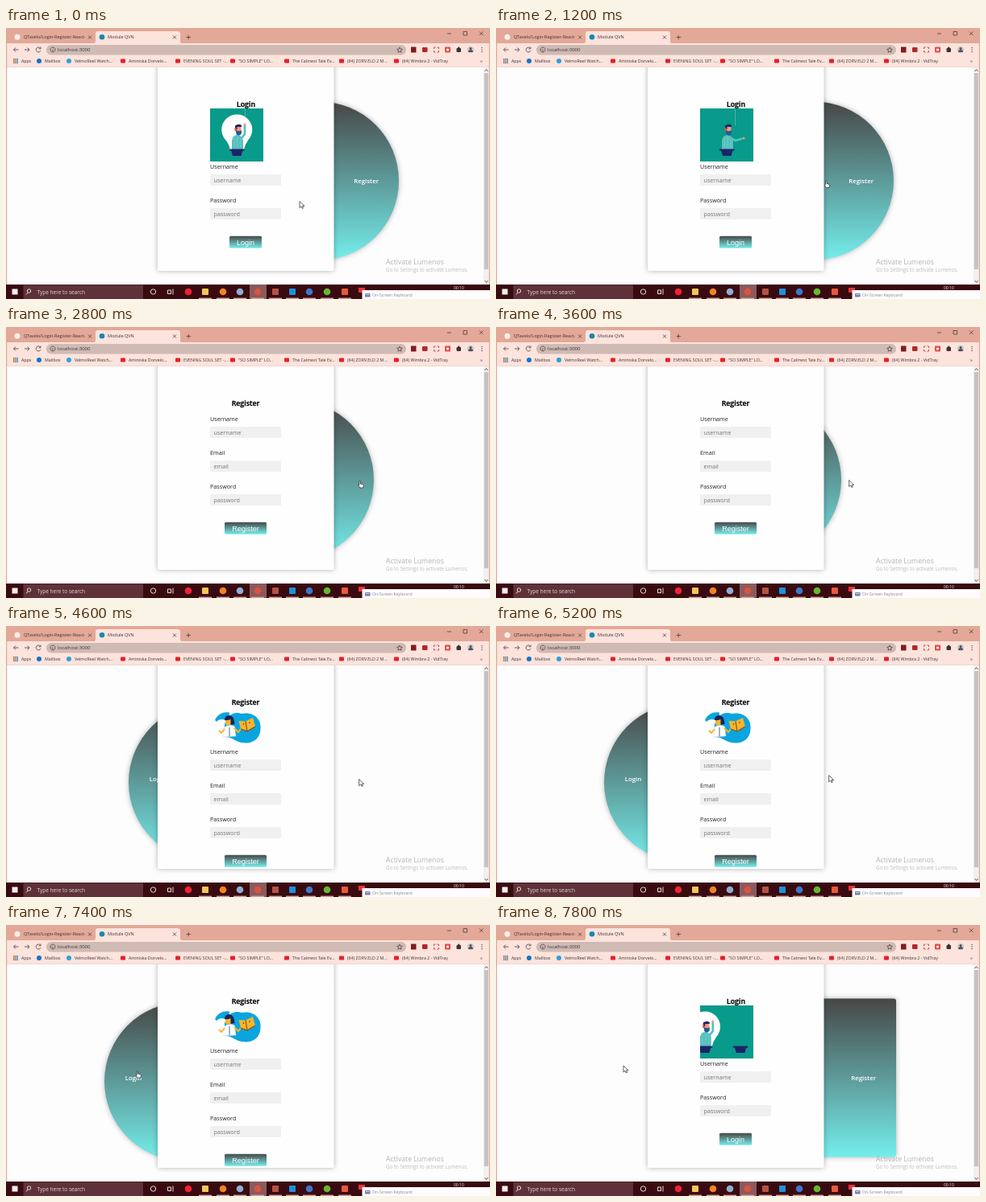
These frames come from a looping animation (600x337 px, 8000 ms). An HTML page:

```html
<!DOCTYPE html>
<html lang="en">
<head>
<meta charset="utf-8">
<title>Login and register</title>
<style>
  html, body { margin: 0; width: 100%; height: 100%; overflow: hidden; background: #fdfdfd; }
  svg { display: block; width: 100vw; height: 100vh; }
  text { font-family: "Open Sans", "Noto Sans", sans-serif; white-space: pre; }
  .tiny { font-size: 5.3px; fill: #3b3335; }
  .tab { font-size: 5.5px; fill: #3b3335; }
  .label { font-size: 7.2px; fill: #222; }
  .hint { font-size: 7.2px; fill: #777; }
  .title { font-size: 8.8px; font-weight: 600; fill: #000; stroke: #000; stroke-width: .3; text-anchor: middle; }
  .button { font: 9px "Liberation Sans", Arial, sans-serif; fill: #fff; text-anchor: middle; }
  .side { font-size: 7.8px; font-weight: 600; fill: #fff; }
  .shadow { filter: drop-shadow(0 0 3px rgba(15, 15, 15, .32)); }
  .line { fill: none; stroke: #5c4a4a; stroke-width: .9; }
</style>
</head>
<body>
<svg viewBox="0 0 600 337" preserveAspectRatio="none">
  <defs>
    <linearGradient id="fade" x2="0" y2="1">
      <stop offset="0" stop-color="#474747"/>
      <stop offset="1" stop-color="#74eeec"/>
    </linearGradient>
    <clipPath id="frame"><rect x="253" y="100" width="66" height="66"/></clipPath>
    <g id="basket" fill="#1c2368">
      <rect x="277" y="150.5" width="18.500" height="2.200" rx="1"/>
      <path d="M279 152H293.500L291.500 159H281Z"/>
    </g>
    <g id="man">
      <path d="M280 151V140Q281 133 287 133Q294 134 294 141V151Z" fill="#55c1bd"/>
      <path d="M283 138V149M287 136V149M291 138V149" stroke="#c7efeb" stroke-width=".7" stroke-dasharray="1 1.800"/>
      <rect x="285" y="122" width="6.500" height="8" rx="2.500" fill="#f39a72"/>
      <path d="M284.500 126Q288 130 292 127V131Q289 136 285.500 132Z" fill="#245a9c"/>
      <path d="M284 126V121.500Q288 118.500 292 121V123H286.500V126Z" fill="#252464"/>
      <rect x="283.500" y="124" width="2" height="4" fill="#e4463f"/>
    </g>
    <g id="bulb">
      <path d="M277.500 151Q277 145 272 139A19 19 0 1 1 300.500 139Q296 145 295 151Z" fill="#fff"/>
      <use href="#man"/>
      <path d="M292 137L296 132V121" fill="none" stroke="#55c1bd" stroke-width="2.600"/>
      <circle cx="296" cy="120" r="1.600" fill="#f39a72"/>
      <use href="#basket"/>
    </g>
    <g id="arm">
      <path d="M291 137L297 140L305 137.500" fill="none" stroke="#55c1bd" stroke-width="2.600"/>
      <circle cx="307" cy="137" r="1.600" fill="#f39a72"/>
    </g>
  </defs>

  <rect width="600" height="337" fill="#fdfdfe"/>
  <rect id="panel" class="shadow" width="197" height="197" fill="url(#fade)"/>
  <text id="panelText" class="side" y="193"></text>
  <rect class="shadow" x="188" y="40" width="218.500" height="262" rx="2" fill="#fefefe"/>

  <g id="loginForm">
    <text class="title" x="297.500" y="97.500">Login</text>
    <g clip-path="url(#frame)">
      <rect x="253" y="100" width="66" height="66" fill="#089a8a"/>
      <path id="string" d="M296.500 100V121" stroke="#75c9bf" stroke-width=".6"/>
      <use id="oldScene" href="#bulb"/>
      <g id="newScene">
        <g id="newMan"><use href="#man"/><use href="#arm"/></g>
        <use href="#basket"/>
      </g>
    </g>
  </g>
  <g id="registerForm">
    <text class="title" x="297" y="97.500">Register</text>
    <g id="art">
      <path d="M259 117Q264 106 277 107.500L276 119Q266 113 261 119Z" fill="#0aa5df"/>
      <path d="M271 122C276 109 284 106 292 109C306 106 317 115 315.500 128C315 142 304 147 292 145C283 143 279 137 270 138Z" fill="#0aa5df"/>
      <path d="M269.500 138L270.500 126Q277 121 283.500 125L285 137Z" fill="#fff" stroke="#c9d6df" stroke-width=".4"/>
      <path d="M271 128L267 133L264 130M283 127L288 132L291 128" fill="none" stroke="#f8b52d" stroke-width="2"/>
      <rect x="272" y="114" width="7" height="9.500" rx="2.500" fill="#f8b52d"/>
      <path d="M271 117Q271 111 277 111Q283 111.500 283.500 122L278.500 123V116Q274 118 271 117Z" fill="#18235a"/>
      <path d="M277 126V137" stroke="#243b6d" stroke-width=".8"/>
      <path d="M288.500 118L297 118.500L306 114L309 125L299 131L291 128Z" fill="#f7b52c"/>
      <path d="M297 118.500L299 131M291 128L299 131L309 125" fill="none" stroke="#86511f" stroke-width="1.200"/>
      <circle cx="294.500" cy="122" r=".8" fill="#54301c"/><circle cx="302" cy="120" r=".8" fill="#54301c"/>
    </g>
    <g id="fields"></g>
  </g>

  <text x="471" y="293.500" font-size="8.700" fill="#b4b4b6">Activate Lumenos</text>
  <text x="471" y="302.500" font-size="6.200" fill="#bdbdc0">Go to Settings to activate Lumenos.</text>
  <g id="scrollbar">
    <rect x="592" y="49" width="7" height="270" fill="#f1f0f1"/>
    <rect x="592.700" y="56" width="5.300" height="244" fill="#c5c3c4"/>
    <path d="M593.500 54L595.500 51.500L597.500 54M593.500 314L595.500 316.500L597.500 314" class="line"/>
  </g>
  <g id="browser"></g>
  <g id="taskbar"></g>

  <g id="cursor" stroke="#222" stroke-width=".7" fill="#fff">
    <path id="arrow" d="M0 0V8L2 6.300L3.300 9L4.600 8.400L3.400 5.800H6Z"/>
    <path id="hand" d="M1.500 1Q2.300 0 3 1V4L6 4.800Q7 5 6.700 6.500L6 9H2.500L.3 6Q.2 5 1.500 5.500Z"/>
    <path id="beam" d="M-1.500 -3.500H1.500M0 -3.500V3.500M-1.500 3.500H1.500" fill="none"/>
  </g>
</svg>

<script>
const $ = id => document.getElementById(id);
const rect = (x, y, w, h, fill, rx = 0) =>
  `<rect x="${x}" y="${y}" width="${w}" height="${h}" rx="${rx}" fill="${fill}"/>`;
const dot = (x, y, r, fill) => `<circle cx="${x}" cy="${y}" r="${r}" fill="${fill}"/>`;
const text = (x, y, content, cls = "tiny", extra = "") =>
  `<text x="${x}" y="${y}" class="${cls}" ${extra}>${content}</text>`;
const line = d => `<path class="line" d="${d}"/>`;

const field = (name, y) =>
  text(253, y, name, "label") + rect(253, y + 7, 88, 14, "#f1f0f1", 1.5) +
  text(257.5, y + 16.5, name.toLowerCase(), "hint");
const button = (name, y, w) =>
  rect(297 - w / 2, y, w, 15, "url(#fade)", 1.5) + text(297, y + 11, name, "button");

const BAR = "#e3a897";
const TOOLBAR = "#fce3dc";

function buildBrowser() {
  const bookmarks = [
    [41, "#1473c8", "Mailbox"], [78, "#2c9fe0", "VelmoReel Watch..."],
    [145, "", "Aminiska Dorvelo..."], [213, "", "EVENING SOUL SET -..."],
    [281, "", "\"SO SIMPLE\" LO..."], [348, "", "The Calmest Tale Ev..."],
    [416, "", "(64) ZORV.ELD 2 M..."], [484, "", "(64) Wimbra 2 - VidTray"]
  ];
  const marks = bookmarks.map(([x, color, name]) =>
    (color ? dot(x, 41, 3, color) : rect(x - 3, 38.6, 6, 4.8, "#e5202a", 1)) + text(x + 7, 43, name));
  const apps = Array.from({ length: 9 }, (_, i) =>
    rect(9 + i % 3 * 2.2, 38 + (i / 3 | 0) * 2.2, 1.6, 1.6, ["#d9483b", "#3f9c58", "#3d78d0"][i % 3]));
  $("browser").innerHTML =
    rect(0, 0, 600, 20, BAR) + rect(0, 19, 600, 30, TOOLBAR) +
    `<path d="M109 19Q111 19 111 16V7Q111 4 114 4H213Q216 4 216 7V16Q216 19 218 19Z" fill="${TOOLBAR}"/>` +
    dot(14, 11.3, 3.5, "#f9eeea") + text(22, 13.3, "QTavelo/Login-Register-React-", "tab") +
    dot(119, 11.3, 3.3, "#1689ad") + text(126, 13.3, "Module QVN", "tab") +
    line("M102 9.500L106 13.500M106 9.500L102 13.500M207 9.500L211 13.500M211 9.500L207 13.500M223.500 11.500H229M226.200 8.800V14.200") +
    line("M547 7H552M567 4.500H571.500V9H567ZM587 4.500L591.500 9M591.500 4.500L587 9") +
    line("M15.500 27H9.500L12 24.500M9.500 27L12 29.500M23 27H29L26.500 24.500M29 27L26.500 29.500M42.500 25A3 3 0 1 0 43 28.200M43 23.500V25.800H40.700") +
    rect(50, 21, 446, 12.5, "#cfbab4", 6.2) + line("M58 24A3 3 0 1 0 58.100 24M58 26.500V29") +
    text(64, 29.2, "localhost:3000", "tiny", 'style="font-size:6px"') +
    line("M488 24L489 26.200L491.300 26.400L489.500 28L490 30.200L488 29L486 30.200L486.500 28L484.700 26.400L487 26.200Z") +
    rect(502, 23.5, 6.5, 7, "#7d1d20") + rect(516, 24, 6.5, 6, "#b3262a", 1) +
    `<path d="M530.500 26V24H532.500M534.500 24H536.500V26M536.500 28V30H534.500M532.500 30H530.500V28" fill="none" stroke="#d34a49"/>` +
    rect(544, 23.5, 7, 7, "#dc5149", 1) + dot(547.5, 27, 1.6, "#fff") +
    rect(558.5, 25, 5.5, 5, "#3d3233", 1) + dot(561.3, 24.8, 1.2, "#3d3233") +
    dot(576, 27, 4.2, "#c4ccd4") + dot(576, 25.5, 1.5, "#594e50") +
    `<path d="M573 30Q573 27 576 27Q579 27 579 30Z" fill="#594e50"/>` +
    [24.5, 27, 29.5].map(y => dot(590, y, .7, "#544747")).join("") +
    apps.join("") + text(19, 43, "Apps") + marks.join("") + text(588, 43, "»", "tab") +
    rect(0, 48.5, 600, .5, "#e2cdca") +
    `<path d="M.600 0V319M599.400 0V319" stroke="${BAR}" stroke-width="1.200"/>`;
}

function buildTaskbar() {
  const icons = [
    [226, "#ef2433"], [247, "#f3c756", 1], [269, "#f18422"], [290, "#8eaed0"],
    [312, "#dd5140"], [334, "#b55343", 1], [355, "#1d91dd", 1], [376, "#3b78cb"],
    [398, "#66b82e"], [420, "#e8593c", 1]
  ];
  $("taskbar").innerHTML =
    rect(0, 319, 600, 18, "#390b11") + rect(21.5, 319.5, 148.5, 17.5, "#5e3238") +
    rect(7.5, 324.5, 7, 7, "#f4eded") +
    `<g stroke="#e8dcdc" fill="none"><circle cx="28.500" cy="327" r="2.200"/><path d="M27 329L25 331.500"/>
     <circle cx="182.500" cy="328" r="3.200"/><path d="M200.500 326H204.500V330.500H200.500ZM207 324.500V331.500"/></g>` +
    text(38.5, 330.7, "Type here to search", "", 'font-size="6.5" fill="#e4d8d9"') +
    rect(302, 319, 21, 18, "#8a5a5d") +
    icons.map(([x, color, square]) =>
      square ? rect(x - 4, 324, 8, 8, color, 1) : dot(x, 328, 4.3, color)).join("") +
    [247, 269, 290, 312, 334, 355, 376, 398, 420].map(x => rect(x - 8, 335.6, 16, 1.4, "#dca19f")).join("") +
    rect(437, 323, 8, 6, "#e5343a") +
    text(555, 325.3, "00:10", "", 'font-size="5" fill="#f1e7e8"') +
    rect(441.5, 326, 158.5, 11, "#fefcfe") +
    rect(445, 330, 6.5, 4.5, "#7581a5", .6) + rect(446, 331, 4.5, .8, "#e7eaf2") +
    text(454, 334, "On-Screen Keyboard", "", 'font-size="5.2" fill="#8a8798"');
}

// Linear path through [time, value, ...] stops.
function along(stops, t) {
  const i = Math.max(1, stops.findIndex(s => s[0] >= t));
  const [a, b] = stops[stops.length - 1][0] < t ? stops.slice(-2) : [stops[i - 1], stops[i]];
  const k = Math.min(1, (t - a[0]) / (b[0] - a[0]));
  return a.slice(1).map((v, j) => v + (b[j + 1] - v) * k);
}

const panelPath = [[0, 290], [1200, 296], [1800, 299], [2400, 299], [2600, 270], [2800, 259],
  [3600, 231], [4000, 202], [4600, 152], [5200, 134], [6200, 126.5], [7200, 125], [7400, 122]];
const cursorPath = [[0, 364, 215.5], [400, 366, 214], [1200, 407, 189.5], [2200, 436, 191], [2800, 436.5, 191],
  [3600, 437.7, 190.5], [5000, 437.7, 190.5], [6000, 312.5, 166.5], [6400, 312.5, 166.5], [7200, 162, 184], [7800, 158, 175]];

const show = (id, on) => $(id).setAttribute("visibility", on ? "inherit" : "hidden");
const move = (id, x, y = 0) => $(id).setAttribute("transform", `translate(${x} ${y})`);
const set = (el, attrs) => Object.entries(attrs).forEach(([k, v]) => el.setAttribute(k, v));

function drawScene(t) {
  const slide = t >= 7400 ? (t - 7400) / 970 : Math.min(1, Math.max(0, (t - 200) / 600));
  const lit = t >= 1800 && t < 7400;
  move("oldScene", lit ? 0 : -66 * slide);
  move("newScene", 66 * Math.pow(1 - slide, 2.57));
  move("newMan", 0, t < 7400 ? Math.max(0, 1000 - t) / 10 : 60);
  show("newScene", !lit && slide > 0);
  show("newMan", t >= 800 && t < 7400);
  show("string", slide === 0 || (t >= 1000 && t < 7400));
}

function drawCursor(t, left, registering, drop) {
  const [x, y] = along(cursorPath, t);
  const onCard = x > 188 && x < 406;
  const onPanel = !onCard && x > left && x < left + 197 && Math.abs(y - 190) < 98;
  const tops = registering ? [124, 166, 208].map(v => v + drop) : [182, 224];
  const onField = x > 253 && x < 341 && tops.some(v => y >= v && y <= v + 14);
  move("cursor", x, y);
  show("hand", onPanel);
  show("beam", onField);
  show("arrow", !onPanel && !onField);
}

function draw(t) {
  const registering = t >= 2600 && t < 7600;
  const reloaded = t >= 7600;
  const loaded = registering && t >= 4200;
  const drop = loaded ? 42 : 0;
  const left = reloaded ? 299 : along(panelPath, t)[0];

  set($("panel"), { x: left, y: loaded ? 96 : 91.5, rx: reloaded ? 3 : 98.5 });
  $("panelText").textContent = registering ? "Login" : "Register";
  set($("panelText"), {
    x: registering ? left + 25.8 : left + 172, "text-anchor": registering ? "start" : "end"
  });
  show("loginForm", !registering);
  show("registerForm", registering);
  show("art", loaded);
  move("fields", 0, drop);
  drawScene(t);
  drawCursor(t, left, registering, drop);
}

$("loginForm").insertAdjacentHTML("beforeend",
  field("Username", 175) + field("Password", 217) + button("Login", 258.7, 40));
$("fields").innerHTML =
  field("Username", 117) + field("Email", 159) + field("Password", 201) + button("Register", 242.7, 52);
buildBrowser();
buildTaskbar();

const start = performance.now();
function tick() {
  const t = (performance.now() - start) % 8000;
  draw(Math.floor(t / 200) * 200);
  requestAnimationFrame(tick);
}
tick();
</script>
</body>
</html>
```
